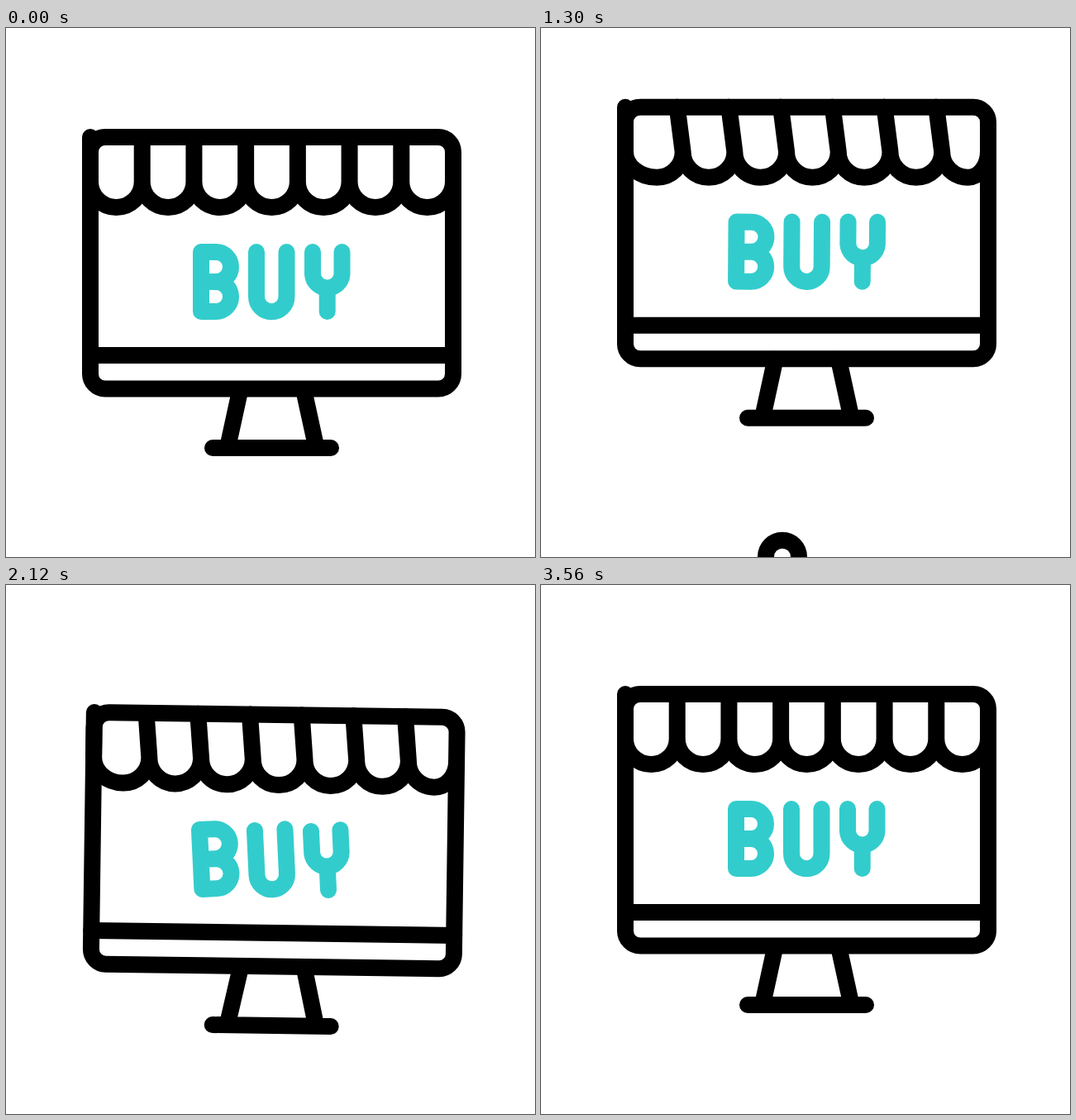
Recreate the animation shown at these times as an HTML page. Size 640x640 px, loop 3600 ms.

```html
<!DOCTYPE html>
<html lang="en">
<head>
<meta charset="utf-8">
<title>Buy</title>
<style>
  html, body { margin: 0; width: 100%; height: 100%; overflow: hidden; background: #fff; }
  svg { display: block; width: 100%; height: 100%; fill: none; stroke: #000; stroke-width: 20;
        stroke-linecap: round; stroke-linejoin: round; }
  #letters { stroke: #3cc; }
  #hand { fill: #fff; }
</style>
</head>
<body>
<svg viewBox="0 0 640 640">
  <g id="monitor">
    <path d="M283.5 437 268 508M360 437 375.5 508M250 508H393"/>
    <path id="awning"/>
    <rect x="102" y="132" width="439" height="304.5" rx="18"/>
    <path d="M102 396H541"/>
    <g id="letters">
      <path d="M236 307V271H254a18 18 0 0 1 0 36a18 18 0 0 1 0 36H236V307H254"/>
      <path d="M303 271V325a18.2 18.2 0 0 0 36.5 0V271"/>
      <path d="M371 271V298a17.8 17.8 0 0 0 35.5 0V271M388.7 316V343"/>
    </g>
  </g>
  <path id="hand"/>
</svg>
<script>
const LOOP = 3600;
const $ = id => document.getElementById(id);

const linear = u => u;
const smooth = u => (1 - Math.cos(Math.PI * u)) / 2;
const settle = u => 1 - (1 - u) ** 1.5;

// Eased progress from 0 to 1 between two times.
const ramp = (t, from, to, ease = smooth) =>
  ease(Math.min(1, Math.max(0, (t - from) / (to - from))));

// Swings through extremes that are evenly spaced in time.
const swing = (t, start, step, extremes) =>
  extremes.reduce((sum, value, i) =>
    sum + (value - (extremes[i - 1] || 0)) * ramp(t, start + i * step, start + (i + 1) * step), 0);

const lift = t => -47 * ramp(t, 980, 1260)
  + 99.5 * ramp(t, 1260, 1820, settle)
  - 52.5 * ramp(t, 1820, 2395, linear);

const tilt = t => 3.2 * (2 * ramp(t, 1820, 2340) - ramp(t, 1400, 1820) - ramp(t, 2340, 2500));

const handY = t => 350 - 360 * ramp(t, 180, 620)
  + 10 * Math.sin(Math.PI * ramp(t, 740, 950, linear))
  + 360 * ramp(t, 950, 1400);

// The hem shifts sideways while its top edge and outer ends stay put.
function awningPath(shift) {
  const count = 7, left = 102, step = 439 / count, top = 132, y = 186, r = 31;
  const hem = i => left + i * step + (i % count ? shift : 0);
  let d = '';
  for (let i = 0; i < count; i++) {
    const mid = left + (i + 0.5) * step + shift;
    d += `M${left + i * step} ${top}L${hem(i)} ${y}`
      + `A${mid - hem(i)} ${r} 0 0 0 ${mid} ${y + r}`
      + `A${hem(i + 1) - mid} ${r} 0 0 0 ${hem(i + 1)} ${y}`;
  }
  return d;
}

const knuckle = 'a20.2 20.2 0 0 0 -40.4 0';
$('hand').setAttribute('d', 'M312 389V331a20 20 0 0 0 -40 0V439'
  + 'C272 481 305 513 346 513H359C400 513 433 481 433 439V389' + knuckle.repeat(3));

const move = (element, transform) => element.setAttribute('transform', transform);

function draw(t) {
  move($('monitor'), `translate(0 ${lift(t)}) rotate(${tilt(t)} 321 485)`);
  $('awning').setAttribute('d', awningPath(swing(t, 800, 480, [7, -10, 7, -10, 0])));
  const lean = swing(t, 1240, 360, [5.7, -6, 0]);
  [...$('letters').children].forEach((letter, i) =>
    move(letter, `rotate(${lean} ${254 + 67.5 * i} 353)`));
  move($('hand'), `translate(0 ${handY(t)})`);
}

const start = performance.now();
function loop() {
  draw((performance.now() - start) % LOOP);
  requestAnimationFrame(loop);
}
loop();
</script>
</body>
</html>
```
